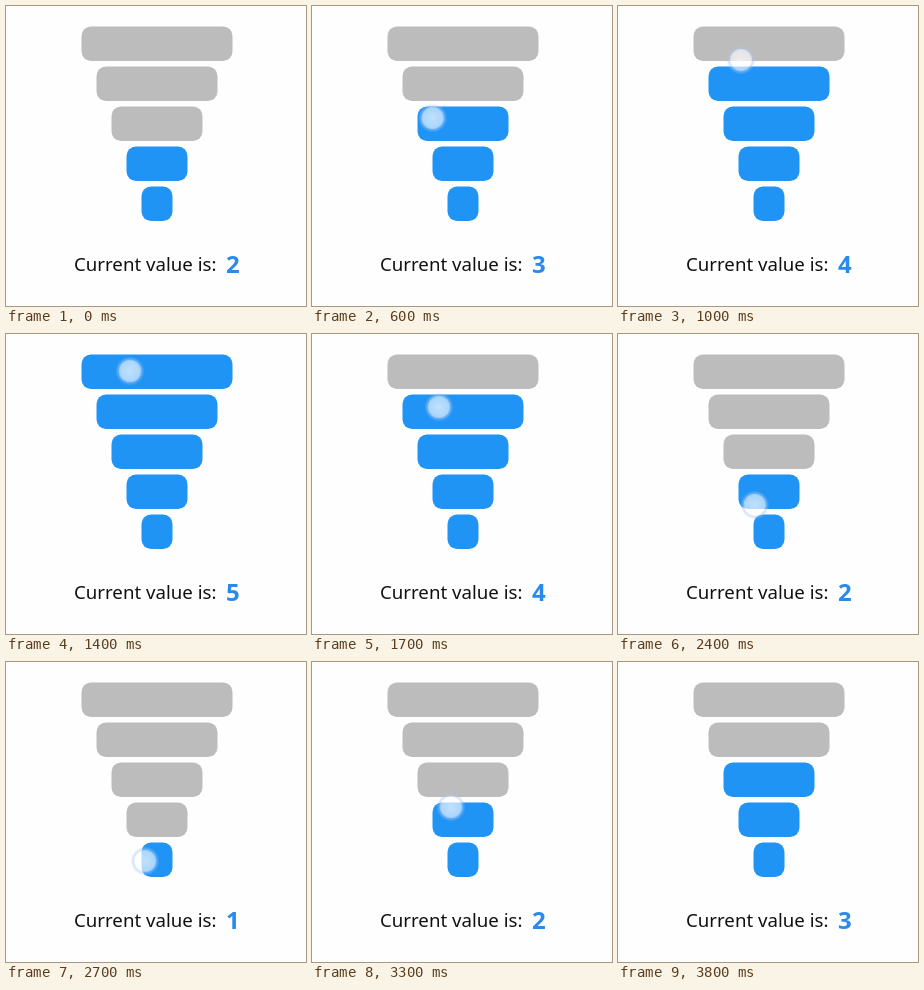
Recreate the animation shown at these times as an HTML page. Size 300 by 300 pixels, loop 4100 ms.

```html
<!DOCTYPE html>
<html lang="en">
<head>
<meta charset="utf-8">
<style>
  html, body { margin: 0; width: 100%; height: 100%; overflow: hidden; background: #fefefe; }
  svg { display: block; width: 100vw; height: 100vh; }
  text { font-family: "Noto Sans", "Open Sans", sans-serif; }
</style>
</head>
<body>
<svg viewBox="0 0 300 300">
  <defs>
    <radialGradient id="glow">
      <stop offset="0" stop-color="#fff" stop-opacity=".72"/>
      <stop offset=".66" stop-color="#fff" stop-opacity=".62"/>
      <stop offset=".74" stop-color="#e2ebfb" stop-opacity=".62"/>
      <stop offset=".8" stop-color="#a9c4f0" stop-opacity=".5"/>
      <stop offset="1" stop-color="#a9c8f4" stop-opacity="0"/>
    </radialGradient>
  </defs>
  <g id="bars"></g>
  <text x="68" y="265" font-size="18.67" fill="#111">Current value is:</text>
  <text id="value" x="220" y="267" font-size="24" font-weight="700" fill="#2a8aeb"></text>
  <circle id="touch" r="14.5" fill="url(#glow)"/>
</svg>
<script>
const LOOP = 4100, STEP = 100, PRESS = 300, RELEASE = 3800;
const $ = id => document.getElementById(id);

// Finger path: time, x, y
const path = [
  [300, 120, 155], [500, 120, 130], [800, 122, 76], [1000, 123, 54],
  [1200, 124, 37], [1300, 124, 34], [1400, 124, 37], [1500, 125, 46],
  [1700, 127, 73], [2100, 133, 129], [2500, 138, 185], [2700, 139, 199],
  [2800, 139, 200], [3000, 139, 183], [3300, 139, 145], [3500, 139, 119],
  [3700, 139, 102]
];

const bars = Array.from({ length: 5 }, (_, i) => {
  const bar = document.createElementNS("http://www.w3.org/2000/svg", "rect");
  const box = { x: 75.5 + 15 * i, y: 20.5 + 40 * i, width: 151 - 30 * i, height: 34.5, rx: 9.5 };
  for (const key in box) bar.setAttribute(key, box[key]);
  return $("bars").appendChild(bar);
});

function position(t) {
  const next = path.findIndex(p => p[0] > t);
  if (next < 0) return path.at(-1).slice(1);
  const a = path[next - 1], b = path[next];
  const k = (t - a[0]) / (b[0] - a[0]);
  return [1, 2].map(i => a[i] + (b[i] - a[i]) * k);
}

const valueAt = y => 5 - Math.max(0, Math.min(4, Math.ceil((y - 53) / 40)));

function draw(now) {
  const t = Math.floor(now % LOOP / STEP) * STEP;
  const pressed = t >= PRESS && t < RELEASE;
  const [x, y] = position(Math.max(PRESS, t));
  const value = valueAt(y);
  bars.forEach((bar, i) => bar.setAttribute("fill", 5 - i <= value ? "#2094f5" : "#bcbcbc"));
  $("value").textContent = value;
  $("touch").setAttribute("transform", `translate(${x} ${y})`);
  $("touch").setAttribute("visibility", pressed ? "visible" : "hidden");
}

const start = performance.now();
function tick() {
  draw(performance.now() - start);
  requestAnimationFrame(tick);
}
tick();
</script>
</body>
</html>
```
